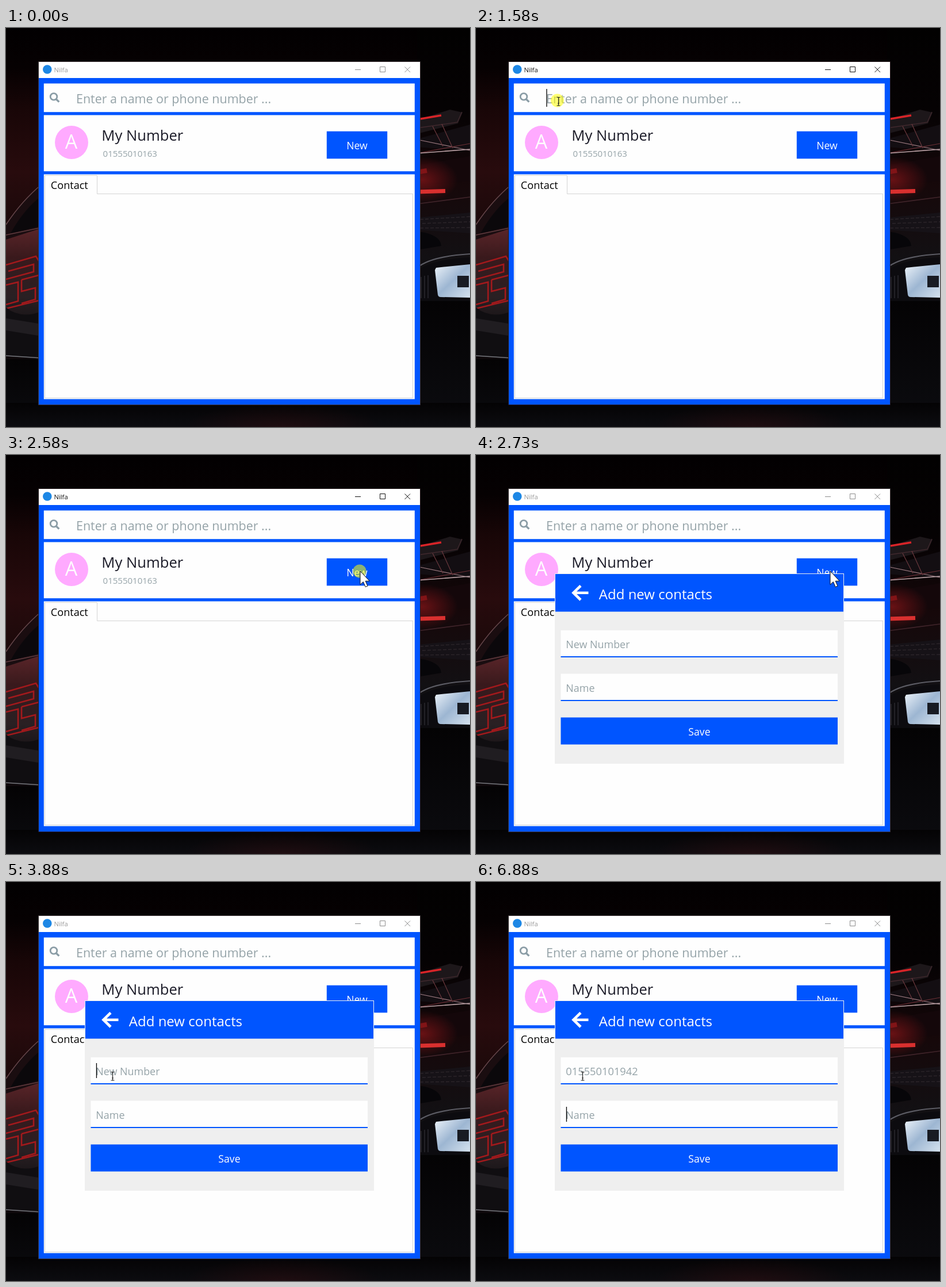
An HTML page that plays this animation: 807x694 px, repeating every 8 s.

```html
<!DOCTYPE html>
<html lang="en">
<head>
<meta charset="utf-8">
<title>Contacts</title>
<style>
  html, body { margin: 0; width: 100%; height: 100%; overflow: hidden; background: #040203; }
  svg { display: block; width: 807px; height: 694px; font-family: "Open Sans", "Noto Sans", sans-serif; }
  .blue { fill: #0055ff; }
  .white { fill: #fefefe; }
  .hint { fill: #95a3a8; }
  .mid { text-anchor: middle; }
  .line { fill: none; }
</style>
</head>
<body>
<svg viewBox="0 0 807 694">
  <defs>
    <linearGradient id="sky" x2="0" y2="1">
      <stop offset="0" stop-color="#020001"/>
      <stop offset=".1" stop-color="#060102"/>
      <stop offset=".2" stop-color="#180607"/>
      <stop offset=".36" stop-color="#280b0d"/>
      <stop offset=".5" stop-color="#1a090a"/>
      <stop offset="1" stop-color="#08080b"/>
    </linearGradient>
    <linearGradient id="hood" x2="0" y2="1">
      <stop offset="0" stop-color="#5a2529"/>
      <stop offset=".3" stop-color="#39191c"/>
      <stop offset=".7" stop-color="#292023"/>
      <stop offset="1" stop-color="#151114"/>
    </linearGradient>
    <linearGradient id="rear" x2="0" y2="1">
      <stop offset="0" stop-color="#020101"/>
      <stop offset=".28" stop-color="#050203"/>
      <stop offset=".55" stop-color="#16080a"/>
      <stop offset=".8" stop-color="#121013"/>
      <stop offset="1" stop-color="#08080a"/>
    </linearGradient>
    <linearGradient id="plate" x2="1" y2="1">
      <stop offset="0" stop-color="#eef4fa"/>
      <stop offset=".5" stop-color="#9db6d2"/>
      <stop offset="1" stop-color="#d5e2ee"/>
    </linearGradient>
    <linearGradient id="floor" x2="0" y2="1">
      <stop offset="0" stop-color="#040304"/>
      <stop offset="1" stop-color="#0c0c10"/>
    </linearGradient>
    <radialGradient id="red">
      <stop offset="0" stop-color="#a0181b" stop-opacity=".6"/>
      <stop offset="1" stop-color="#a0181b" stop-opacity="0"/>
    </radialGradient>
  </defs>

  <!-- backdrop, left side -->
  <rect width="807" height="694" fill="url(#sky)"/>
  <path d="M0 342 Q28 300 62 272 V400 L0 412Z" fill="#1a0d10"/>
  <path d="M0 342 Q28 300 62 272" class="line" stroke="#66474b" stroke-width="1.6"/>
  <path d="M8 357 Q32 314 62 292 V344Z" fill="#0b080b"/>
  <path d="M0 368 L62 348 V500 L0 520Z" fill="url(#hood)"/>
  <path d="M0 360 L62 347" class="line" stroke="#623c40" stroke-width="1.5"/>
  <g class="line" stroke="#a3191c" stroke-width="2.6">
    <path d="M0 412 L52 397 L57 405 M4 423 L48 411 V424 L0 437"/>
    <path d="M0 447 L21 442 V475 L0 481 M27 438 L57 430 M27 438 V458 L51 452 V472 L27 479"/>
    <path d="M0 488 L57 474"/>
  </g>
  <path d="M0 486 Q25 507 62 493 V577 L0 571Z" fill="#100e11"/>
  <path d="M0 505 L62 515 V536 L0 526Z" fill="#201d21"/>
  <path d="M0 570 L62 574" class="line" stroke="#77777d" stroke-width="1.3"/>
  <rect y="576" width="62" height="118" fill="url(#floor)"/>

  <!-- backdrop, right side -->
  <rect x="715" width="92" height="500" fill="url(#rear)"/>
  <path d="M715 160 L772 142 L794 147 L786 166 L715 184Z" fill="#1d171a"/>
  <path d="M715 174 L785 164 L793 146" class="line" stroke="#41292e" stroke-width="1.3"/>
  <path d="M715 159 L757 152" class="line" stroke="#d92428" stroke-width="3.4"/>
  <path d="M715 193 L807 168 V214 L715 207Z" fill="#130e12"/>
  <g class="line" stroke-width="1.2">
    <path d="M715 194 L807 213" stroke="#9c7a80"/>
    <path d="M715 218 L807 201" stroke="#6b2f35"/>
    <path d="M742 171 L760 206 M758 167 L777 209" stroke="#6b393e"/>
    <path d="M715 218 L807 211" stroke="#bda4a8" stroke-width="1.6"/>
  </g>
  <path d="M715 239 L807 223 V266 L715 274Z" fill="#14070a"/>
  <ellipse cx="724" cy="264" rx="62" ry="40" fill="url(#red)"/>
  <path d="M715 251 L732 248" class="line" stroke="#811417" stroke-width="8"/>
  <path d="M715 285 L764 283.5" class="line" stroke="#d9302f" stroke-width="7"/>
  <path d="M715 306 L807 294" class="line" stroke="#40242a" stroke-width="1.6"/>
  <path d="M715 330 L807 321 V357 L715 351Z" fill="#161217"/>
  <g class="line" stroke="#2d262b" stroke-width="1.3" stroke-dasharray="6 3">
    <path d="M720 333 L807 328 M724 340 L807 337 M720 348 L807 347"/>
  </g>
  <path d="M715 354 Q755 358 757 379 L715 386Z" fill="#070609"/>
  <path d="M715 417 Q739 397 807 393" class="line" stroke="#5c5c64" stroke-width="2.2"/>
  <path d="M715 423 Q739 402 807 399 V474 H715Z" fill="#0c0b0f"/>
  <path d="M722 433 V470 M728 431 V470 M734 430 V470" class="line" stroke="#222127" stroke-width="2"/>
  <path d="M748 417 L807 411 V469 L756 468 Q752 468 751 464 L746 421Z" fill="url(#plate)"/>
  <rect x="785" y="431" width="20" height="20" fill="#181b23"/>
  <rect x="715" y="475" width="92" height="219" fill="url(#floor)"/>
  <rect y="652" width="807" height="42" fill="url(#floor)"/>
  <ellipse cx="480" cy="694" rx="170" ry="40" fill="url(#red)" opacity=".22"/>

  <!-- main window -->
  <rect id="edge" x="56.5" y="58.5" width="664" height="597" class="line"/>
  <rect x="57" y="59" width="663" height="28" fill="#fff"/>
  <circle cx="71.8" cy="72" r="7.8" fill="#1d87e5"/>
  <text id="title" x="83.5" y="77" font-size="11.2">Nilfa</text>
  <path id="controls" class="line" d="M607 72.5 H617 M650.5 67.5 h9 v9 h-9Z M693.5 67.5 l9.5 9.5 M703 67.5 l-9.5 9.5"/>
  <rect x="57" y="87" width="663" height="568" class="blue"/>
  <g class="white">
    <rect x="65.8" y="96.5" width="645" height="49.7"/>
    <rect x="65.8" y="151.5" width="645" height="97.7"/>
    <rect x="65.8" y="254.5" width="645" height="391"/>
  </g>
  <circle cx="83" cy="119.4" r="5.8" class="line" stroke="#8b9da6" stroke-width="2.8"/>
  <path d="M87 123.5 L92.3 128.6" class="line" stroke="#8b9da6" stroke-width="3.4"/>
  <text x="122" y="131" font-size="21.45" class="hint">Enter a name or phone number ...</text>

  <circle cx="114" cy="199" r="29" fill="#ffaaff"/>
  <text x="113.5" y="210" font-size="34" class="white mid">A</text>
  <text x="166.3" y="196" font-size="25.6" fill="#1b1b28">My Number</text>
  <text x="168.6" y="224" font-size="15" class="hint">01555010163</text>
  <rect x="557.8" y="179.7" width="105.4" height="47.6" class="blue"/>
  <text x="610.5" y="211.4" font-size="17.6" class="white mid">New</text>

  <path d="M67.5 643.5 V256.5 H158.5 V288.5 H707.5 V643.5Z" class="line" stroke="#d4d4d4"/>
  <text x="77.8" y="280" font-size="18.1">Contact</text>

  <!-- dialog -->
  <g id="dialog">
    <rect x="137" y="206" width="503" height="331" fill="#efefef"/>
    <rect x="138" y="207" width="501" height="65.5" class="blue"/>
    <path d="M195.5 239.7 H170 M182 227.5 L169.5 239.7 L182 252" class="line" stroke="#fefefe" stroke-width="4.6"/>
    <text x="213.8" y="250.5" font-size="24" class="white">Add new contacts</text>
    <g class="white">
      <rect x="147.5" y="305" width="481.5" height="46"/>
      <rect x="147.5" y="380.5" width="481.5" height="46"/>
    </g>
    <g class="blue">
      <rect x="147.5" y="350" width="481.5" height="2"/>
      <rect x="147.5" y="426" width="481.5" height="2"/>
      <rect x="147.5" y="456.5" width="481.5" height="47"/>
    </g>
    <text id="number" y="336" class="hint"></text>
    <text x="156.3" y="412" font-size="17.9" class="hint">Name</text>
    <text x="388.5" y="487.5" font-size="17.7" class="white mid">Save</text>
  </g>

  <rect id="caret" width="1.3"/>
  <circle id="glow" r="11.5" fill="#ffff00" fill-opacity=".55"/>
  <path id="arrow" d="M0 0 V23.5 L5.3 18.6 L9.2 27.5 L13 25.8 L9.2 17.2 H16.4Z" fill="#fff" stroke="#111" stroke-width="1"/>
  <path id="beam" class="line" d="M-3 -7 H-1 Q0 -7 0 -6 Q0 -7 1 -7 H3 M0 -6 V6.5 M-3 7.5 H-1 Q0 7.5 0 6.5 Q0 7.5 1 7.5 H3 M-1.5 3.5 H1.5" stroke="#222" stroke-width="1.2"/>
</svg>
<script>
const LOOP = 8000;
const ACTIVE = 1510, PRESS = 2580, OPEN = 2730, FOCUS = 3680, TAB = 6880;
const DIGITS = "015550101942", DIGIT_SIZE = 18.3, DIGIT_STEP = 10.42;
const keyTimes = [4890, 5150, 5280, 5410, 5540, 5540, 5810, 5880, 5940, 5940, 6080, 6140];

// first step, last step, number of steps, destination
const moves = [
  [240, 1040, 12, 150, 159],
  [1110, 1310, 4, 143.5, 127.5],
  [1930, 2190, 5, 628, 249],
  [2390, 2450, 2, 616, 202],
  [3060, 3200, 3, 137, 366],
  [3400, 3470, 2, 182, 345],
  [3610, 3610, 1, 185.5, 337.5]
];
// start, end, centre of each click highlight
const clicks = [
  [ACTIVE, 1660, 141.5, 126],
  [PRESS, OPEN, 615, 202],
  [FOCUS, 3880, 184, 337.5]
];

const el = id => document.getElementById(id);
const within = (t, a, b) => t >= a && t < b;
const set = (id, attrs) => {
  for (const name in attrs) el(id).setAttribute(name, attrs[name]);
};
const show = (id, on) => set(id, { visibility: on ? "visible" : "hidden" });

function pointer(t) {
  let x = 385, y = 602;
  for (const [start, end, steps, toX, toY] of moves) {
    if (t < start) break;
    const done = steps > 1 ? (t - start) / (end - start) * (steps - 1) : 0;
    const k = Math.min(steps, Math.floor(done + 1e-6) + 1) / steps;
    const ease = k * k * (3 - 2 * k);
    x += (toX - x) * ease;
    y += (toY - y) * ease;
  }
  return [x, y];
}

function caretAt(t, typed) {
  if (within(t, ACTIVE, PRESS)) return [122.3, 106, 31];
  if (within(t, FOCUS, TAB)) return [156.8 + typed * DIGIT_STEP, 315, 26];
  return t >= TAB ? [156.8, 391, 26] : null;
}

function draw(t) {
  const active = within(t, ACTIVE, OPEN);
  set("title", { fill: active ? "#111" : "#999" });
  set("controls", { stroke: active ? "#111" : "#8c8c8c" });
  set("edge", { stroke: active ? "#24181b" : "#3a3033" });
  show("dialog", t >= OPEN);

  const typed = keyTimes.filter(k => t >= k).length;
  el("number").textContent = typed ? DIGITS.slice(0, typed) : "New Number";
  set("number", { x: 156.3, "font-size": typed ? DIGIT_SIZE : 17.9 });

  const caret = caretAt(t, typed);
  show("caret", caret);
  if (caret) set("caret", { x: caret[0], y: caret[1], height: caret[2] });

  const click = clicks.find(c => within(t, c[0], c[1]));
  show("glow", click);
  if (click) set("glow", { cx: click[2], cy: click[3] });

  const [x, y] = pointer(t);
  const overText = within(t, 1180, 2000) || t >= 3400;
  const place = `translate(${x.toFixed(1)} ${y.toFixed(1)})`;
  set("arrow", { transform: place });
  set("beam", { transform: place });
  show("arrow", t >= 70 && !overText);
  show("beam", overText);
}

const began = performance.now();
function tick() {
  draw((performance.now() - began) % LOOP);
  requestAnimationFrame(tick);
}
draw(0);
requestAnimationFrame(tick);
</script>
</body>
</html>
```
